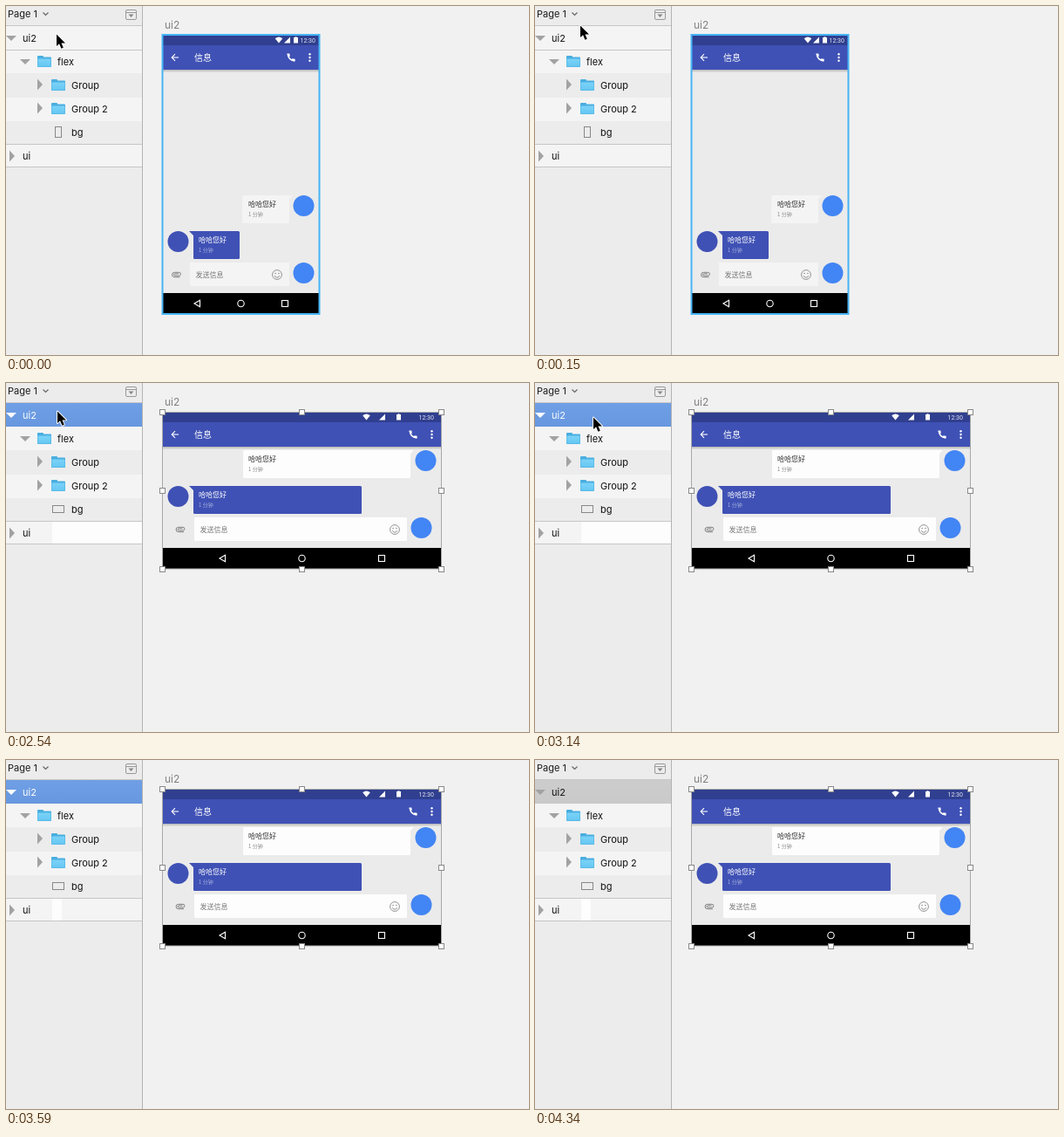
These frames come from a looping animation (600 by 400 pixels, 4640 ms). An HTML page with a canvas:

```html
<!DOCTYPE html>
<html lang="zh-CN">
<head>
<meta charset="utf-8">
<title>Layout resize</title>
<style>
html, body { margin: 0; width: 100%; height: 100%; overflow: hidden; background: #f1f1f1; }
canvas { display: block; }
</style>
</head>
<body>
<canvas id="stage" width="600" height="400"></canvas>
<script>
const ctx = document.getElementById('stage').getContext('2d');
const LOOP = 4640;
const UI = 'Inter, Roboto, sans-serif';
const CJK = '"Noto Sans CJK SC", "Noto Sans CJK", sans-serif';
const INDIGO = '#3f51b5', BLUE = '#4285f4';

// Pointer tip by start time; null hides it.
const pointer = [
  [0, [58, 32]], [150, [52, 22]], [450, [59, 32]], [3140, [67, 39]],
  [3290, [203, 181]], [3440, [385, 345]], [3590, null]
];

const portrait = {
  w: 180, h: 320, card: '#f4f4f4',
  wifi: 313, signal: 319, battery: 330, clock: 337.5, call: 327, more: 348.5,
  sent: [271, 217, 54], sentDot: [341.5, 229], got: [215, 258, 53],
  clip: 195.5, field: [211, 294, 114], smile: 311, fieldDot: [341.5, 306],
  nav: [219.5, 269.5, 320]
};
const landscape = {
  w: 320, h: 180, card: '#fdfdfd',
  wifi: 413.5, signal: 428, battery: 448, clock: 473.5, call: 467, more: 488.5,
  sent: [272, 77, 192], sentDot: [481.5, 89], got: [215, 118, 193],
  clip: 200, field: [216, 154, 244], smile: 446, fieldDot: [476.5, 166],
  nav: [248.5, 339.5, 431]
};

function rect(x, y, w, h, color) {
  ctx.fillStyle = color;
  ctx.fillRect(x, y, w, h);
}

function box(x, y, w, h, color, width = 1) {
  ctx.strokeStyle = color;
  ctx.lineWidth = width;
  ctx.strokeRect(x, y, w, h);
}

function card(x, y, w, h, color, r = 1.5) {
  ctx.fillStyle = color;
  ctx.beginPath();
  ctx.roundRect(x, y, w, h, r);
  ctx.fill();
}

function trace(pts, closed) {
  ctx.beginPath();
  pts.forEach(([x, y]) => ctx.lineTo(x, y));
  if (closed) ctx.closePath();
}

function poly(pts, color) {
  trace(pts, true);
  ctx.fillStyle = color;
  ctx.fill();
}

function line(pts, color, width = 1, closed = false) {
  trace(pts, closed);
  ctx.strokeStyle = color;
  ctx.lineWidth = width;
  ctx.stroke();
}

function disc(x, y, r, color) {
  ctx.fillStyle = color;
  ctx.beginPath();
  ctx.arc(x, y, r, 0, Math.PI * 2);
  ctx.fill();
}

function arc(x, y, r, color, width = 1, from = 0, to = Math.PI * 2) {
  ctx.strokeStyle = color;
  ctx.lineWidth = width;
  ctx.beginPath();
  ctx.arc(x, y, r, from, to);
  ctx.stroke();
}

function text(str, x, y, size, color, family = UI) {
  ctx.font = `${size}px ${family}`;
  ctx.fillStyle = color;
  ctx.fillText(str, x, y);
}

const openMark = (x, y, color) => poly([[x, y], [x + 12, y], [x + 6, y + 6]], color);
const shutMark = (x, y, color) => poly([[x, y], [x + 6, y + 6.5], [x, y + 13]], color);

function folder(x, y) {
  card(x, y, 7, 5, '#49aee0', 1);
  card(x, y + 1.5, 16, 11.5, '#49aee0', 1);
  const g = ctx.createLinearGradient(0, y + 3, 0, y + 13);
  g.addColorStop(0, '#7dd3f8');
  g.addColorStop(1, '#64c6f2');
  card(x + 0.5, y + 3.5, 15, 9, g, 0.5);
}

function rowFill(top, bottom) {
  const g = ctx.createLinearGradient(0, 23, 0, 50);
  g.addColorStop(0, top);
  g.addColorStop(1, bottom);
  rect(0, 23, 156, 27, g);
}

function sidebar(t) {
  const wide = t >= 2540;
  const active = t >= 450 && t < 4340;
  rect(0, 0, 156, 400, '#ececec');
  for (const y of [23, 51, 105, 159]) rect(0, y, 156, 26, '#f4f4f4');
  rect(0, 49, 156, 28, '#f4f4f4');
  rect(0, 131, 156, 1, '#f4f4f4');
  if (wide) rect(53, 159, t < 3290 ? 103 : 11, 25, '#fdfdfd');
  for (const y of [22, 50, 158, 184]) rect(0, y, 156, 1, '#c6c6c6');
  if (active) rowFill('#6f9fe5', '#6797df');
  else if (t >= 4340) rowFill('#cdcdcd', '#c9c9c9');
  if (t >= 450) rect(0, 50, 156, 1, '#f4f4f4');
  rect(156, 0, 1, 400, '#b4b4b4');

  text('Page 1', 2, 13, 11, '#1c1c1c');
  line([[42.5, 7.5], [45.5, 10.5], [48.5, 7.5]], '#666', 1.2);
  ctx.beginPath();
  ctx.roundRect(137.5, 4.5, 12, 11, 1.5);
  ctx.strokeStyle = '#999';
  ctx.lineWidth = 1;
  ctx.stroke();
  line([[138, 7.5], [149, 7.5]], '#999');
  poly([[140.5, 9.5], [146.5, 9.5], [143.5, 13]], '#888');

  const gray = '#a2a2a2', ink = '#111';
  openMark(0, 34, active ? '#fff' : gray);
  text('ui2', 19, 41, 11, active ? '#fff' : ink);
  openMark(16, 61, gray);
  folder(36, 57);
  text('flex', 59, 68, 11, ink);
  ['Group', 'Group 2'].forEach((name, i) => {
    const y = 27 * i;
    shutMark(36, 83.5 + y, gray);
    folder(52, 84 + y);
    text(name, 75, 95 + y, 11, ink);
  });
  if (wide) box(53.5, 140.5, 13, 8, '#888');
  else box(56.5, 138.5, 7, 12, '#888');
  text('bg', 75, 149, 11, ink);
  shutMark(4, 165.5, gray);
  text('ui', 19, 176, 11, ink);
}

function statusBar(p) {
  rect(180, 33, p.w, 12, '#303f8f');
  ctx.fillStyle = '#fff';
  ctx.beginPath();
  ctx.moveTo(p.wifi, 42.5);
  ctx.arc(p.wifi, 42.5, 6.8, -Math.PI * 0.72, -Math.PI * 0.28);
  ctx.fill();
  poly([[p.signal, 42.5], [p.signal + 7, 42.5], [p.signal + 7, 35.5]], '#fff');
  rect(p.battery, 36, 5, 6.5, '#fff');
  rect(p.battery + 1.5, 35.3, 2, 1, '#fff');
  text('12:30', p.clock, 41.5, 7, '#e4e6f2', 'Roboto, sans-serif');
}

function toolbar(p) {
  for (let i = 0; i < 3; i++) rect(180, 73 + i, p.w, 1, `rgba(0,0,0,${0.2 - i * 0.07})`);
  rect(180, 45, p.w, 28, INDIGO);
  line([[198, 59], [190.5, 59]], '#fff', 1.1);
  line([[194, 55.2], [190.2, 59], [194, 62.8]], '#fff', 1.1);
  text('信息', 216, 62.8, 10, '#fff', CJK);

  ctx.save();
  ctx.translate(p.call, 59);
  ctx.strokeStyle = '#fff';
  ctx.lineWidth = 1.7;
  ctx.beginPath();
  ctx.moveTo(-3.7, -4);
  ctx.quadraticCurveTo(-3, 3, 4, 3.8);
  ctx.stroke();
  poly([[-4.6, -4.6], [-1.7, -4.6], [-1.2, -1.7], [-3, 0]], '#fff');
  poly([[4.6, 4.6], [4.6, 1.7], [1.7, 1.2], [0, 3]], '#fff');
  ctx.restore();

  for (const y of [55.2, 59, 62.8]) disc(p.more, y, 1.2, '#fff');
}

function message(x, y, ink, faint) {
  text('哈哈您好', x, y + 13, 8, ink, CJK);
  text('1 分钟', x, y + 24.3, 6, faint, CJK);
}

function paperclip(x, y) {
  ctx.strokeStyle = '#777';
  ctx.lineWidth = 0.9;
  ctx.beginPath();
  ctx.moveTo(x + 4, y + 2.7);
  ctx.lineTo(x - 2.2, y + 2.7);
  ctx.arc(x - 2.2, y, 2.7, Math.PI / 2, Math.PI * 1.5);
  ctx.lineTo(x + 3, y - 2.7);
  ctx.arc(x + 3, y - 0.8, 1.9, -Math.PI / 2, Math.PI / 2);
  ctx.lineTo(x - 1.8, y + 1.1);
  ctx.arc(x - 1.8, y, 1.1, Math.PI / 2, Math.PI * 1.5);
  ctx.lineTo(x + 2.5, y - 1.1);
  ctx.stroke();
}

function smiley(x, y) {
  arc(x, y, 5.4, '#888', 0.9);
  disc(x - 1.9, y - 1.5, 0.8, '#888');
  disc(x + 1.9, y - 1.5, 0.8, '#888');
  arc(x, y + 0.4, 2.8, '#888', 0.9, 0.25, Math.PI - 0.25);
}

function chat(p) {
  const [sx, sy, sw] = p.sent;
  card(sx, sy, sw, 32, p.card);
  poly([[sx + sw - 1, sy], [sx + sw + 4, sy], [sx + sw - 1, sy + 5]], p.card);
  message(278, sy, '#333', '#888');
  disc(...p.sentDot, 12, BLUE);

  const [gx, gy, gw] = p.got;
  disc(197.5, gy + 12, 12, INDIGO);
  card(gx, gy, gw, 32, INDIGO);
  poly([[gx - 5, gy], [gx + 2, gy], [gx + 2, gy + 7]], INDIGO);
  message(221, gy, '#fff', '#a9b1de');

  const [fx, fy, fw] = p.field;
  paperclip(p.clip, fy + 14);
  card(fx, fy, fw, 27, p.card, 1);
  text('发送信息', fx + 6.5, fy + 17, 8, '#777', CJK);
  smiley(p.smile, fy + 14);
  disc(...p.fieldDot, 12, BLUE);
}

function navBar(p) {
  const top = 33 + p.h - 24, y = top + 12;
  const [back, home, recent] = p.nav;
  rect(180, top, p.w, 24, '#000');
  line([[back - 3.5, y], [back + 3, y - 3.8], [back + 3, y + 3.8]], '#fff', 1.1, true);
  arc(home, y, 3.7, '#fff', 1.1);
  box(recent - 3.5, y - 3.5, 7, 7, '#fff', 1.1);
}

function handles(p) {
  box(179.5, 33.5, p.w, p.h - 0.5, '#a8a8a8');
  for (let i = 0; i < 3; i++) {
    for (let j = 0; j < 3; j++) {
      if (i === 1 && j === 1) continue;
      const x = 176.5 + i * p.w / 2, y = 30 + j * p.h / 2;
      rect(x, y, 6, 6, '#fff');
      box(x, y + 0.5, 6, 6, '#888');
    }
  }
}

function artboard(t) {
  const p = t < 2540 ? portrait : landscape;
  text('ui2', 182, 26, 12, '#808080');
  rect(180, 33, p.w, p.h, '#ebebeb');
  statusBar(p);
  toolbar(p);
  chat(p);
  navBar(p);
  if (t < 450) box(179.5, 33, p.w, p.h, '#46b4f5', 2);
  else handles(p);
}

function cursor(t) {
  const tip = pointer.filter(([start]) => t >= start).pop()[1];
  if (!tip) return;
  ctx.save();
  ctx.translate(...tip);
  const arrow = [[0, 0.5], [0, 14], [3.1, 11.2], [5.4, 16.8], [7.8, 15.8], [5.5, 10.4], [10, 10.4]];
  ctx.lineJoin = 'round';
  line(arrow, '#fff', 1.8, true);
  poly(arrow, '#000');
  ctx.restore();
}

function draw(t) {
  rect(0, 0, 600, 400, '#f1f1f1');
  sidebar(t);
  artboard(t);
  cursor(t);
}

function tick() {
  draw(performance.now() % LOOP);
  requestAnimationFrame(tick);
}
tick();
</script>
</body>
</html>
```
